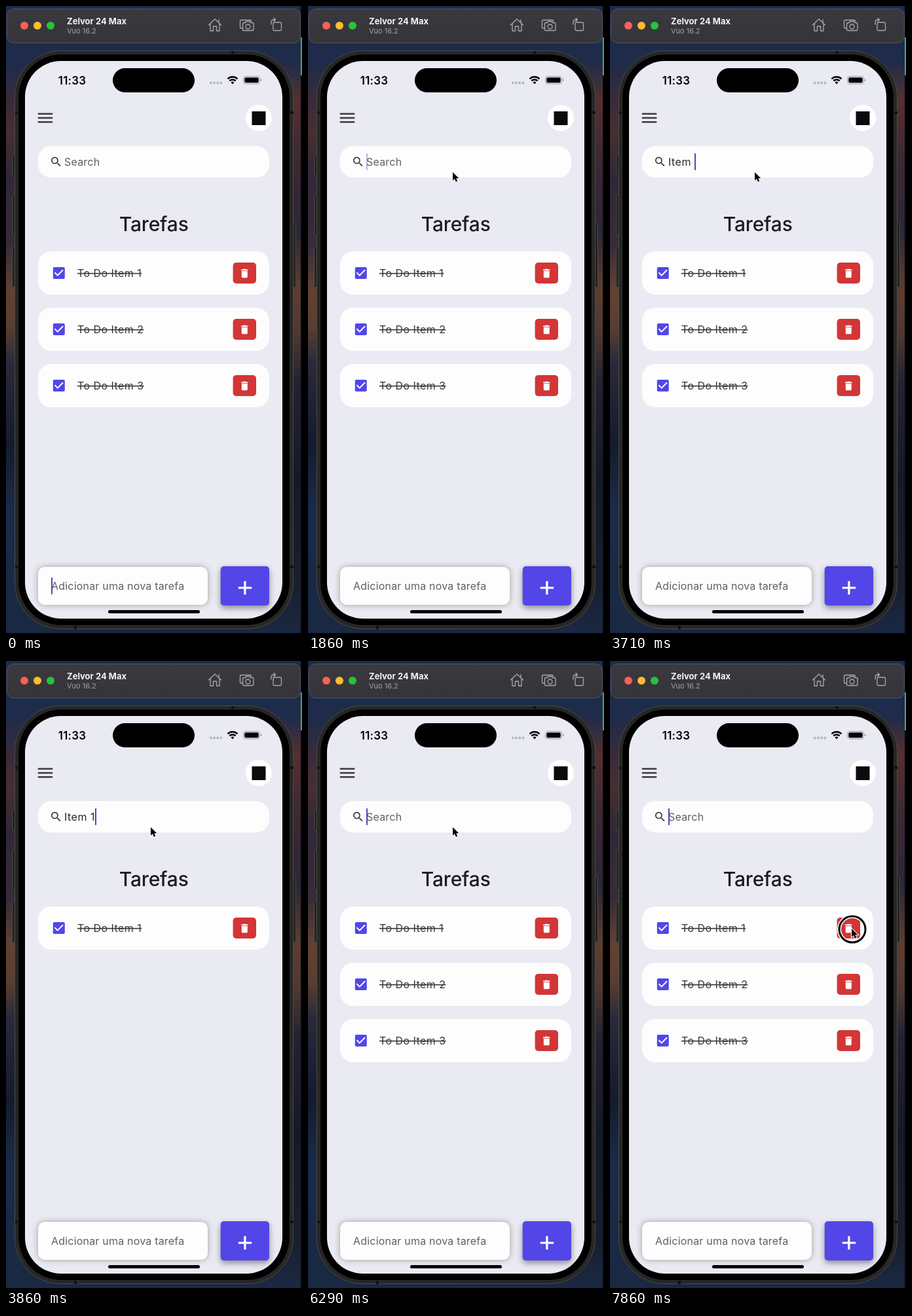
Write an HTML page that moves like this. It is 452 by 958 pixels and loops after 8 s.

```html
<!DOCTYPE html>
<html lang="pt">
<head>
<meta charset="utf-8">
<title>Tarefas</title>
<style>
html, body { margin: 0; width: 100%; height: 100%; overflow: hidden; background: #17182a; }
svg { display: block; width: 452px; height: 958px; font-family: Inter, Roboto, "Liberation Sans", sans-serif; }
text { white-space: pre; }
.field { font-size: 16px; letter-spacing: .2px; }
.hint { fill: #606065; }
.item { font-size: 16px; letter-spacing: .45px; fill: #37373b; text-decoration: line-through; }
.line { fill: none; stroke: #aaa9ae; stroke-width: 1.3; stroke-linejoin: round; stroke-linecap: round; }
#query { letter-spacing: .5px; fill: #28282c; }
</style>
</head>
<body>
<svg viewBox="0 0 452 958">
  <defs>
    <linearGradient id="skyL" x2="0" y2="1">
      <stop offset="0" stop-color="#1c2c4c"/>
      <stop offset=".09" stop-color="#1f2b4a"/>
      <stop offset=".14" stop-color="#352b3c"/>
      <stop offset=".2" stop-color="#482e32"/>
      <stop offset=".27" stop-color="#302738"/>
      <stop offset=".38" stop-color="#382b39"/>
      <stop offset=".45" stop-color="#614132"/>
      <stop offset=".51" stop-color="#5c3e30"/>
      <stop offset=".57" stop-color="#2a293c"/>
      <stop offset=".7" stop-color="#141b2c"/>
      <stop offset=".8" stop-color="#1a2b49"/>
      <stop offset="1" stop-color="#1a2942"/>
    </linearGradient>
    <linearGradient id="skyR" x2="0" y2="1">
      <stop offset="0" stop-color="#1c2c4c"/>
      <stop offset=".09" stop-color="#1f2b4a"/>
      <stop offset=".15" stop-color="#553030"/>
      <stop offset=".25" stop-color="#3c2833"/>
      <stop offset=".36" stop-color="#2c2638"/>
      <stop offset=".45" stop-color="#5c3e30"/>
      <stop offset=".52" stop-color="#523830"/>
      <stop offset=".6" stop-color="#232234"/>
      <stop offset=".75" stop-color="#151927"/>
      <stop offset=".93" stop-color="#191f30"/>
      <stop offset="1" stop-color="#1a2942"/>
    </linearGradient>
    <linearGradient id="bar" x2="0" y2="1">
      <stop offset="0" stop-color="#3a393f"/>
      <stop offset="1" stop-color="#353439"/>
    </linearGradient>
    <g id="card">
      <rect x="49" y="375" width="353" height="66" rx="20" fill="#fdfdfe"/>
      <path transform="translate(68.800 396)" fill="#5346e8" d="M19 3H5c-1.11 0-2 .9-2 2v14c0 1.1.89 2 2 2h14c1.11 0 2-.9 2-2V5c0-1.1-.89-2-2-2zm-9 14l-5-5 1.41-1.41L10 14.17l7.59-7.59L19 8l-9 9z"/>
      <rect x="346.600" y="392" width="35.400" height="32" rx="5" fill="#d33636"/>
      <path transform="translate(355.300 399.500) scale(.75)" fill="#fff" d="M6 19c0 1.1.9 2 2 2h8c1.1 0 2-.9 2-2V7H6v12zM19 4h-3.5l-1-1h-5l-1 1H5v2h14V4z"/>
    </g>
  </defs>

  <!-- desktop -->
  <rect width="230" height="958" fill="url(#skyL)"/>
  <rect x="230" width="222" height="958" fill="url(#skyR)"/>
  <rect x="450" width="2" height="958" fill="#08080c"/>
  <rect x="450" y="48" width="2" height="58" fill="#43a287"/>

  <!-- window bar -->
  <rect x="1.5" y="4.5" width="448" height="52" rx="10" fill="url(#bar)" stroke="#55545a"/>
  <circle cx="28" cy="30" r="6" fill="#fe5f57"/>
  <circle cx="48" cy="30" r="6" fill="#febc2e"/>
  <circle cx="68" cy="30" r="6" fill="#28c23c"/>
  <text x="93" y="28" font-size="13" font-weight="700" fill="#f4f4f5">Zelvor 24 Max</text>
  <text x="93" y="42" font-size="11" fill="#a3a2a8">Vuo 16.2</text>
  <g class="line">
    <path d="M309.500 29L319 20l9.500 9M312 27v11h4.500v-7h5v7h4.500V27M325 25v-4"/>
    <path d="M361 34h-1.500q-2 0-2-2v-8.500q0-2 2-2h13q2 0 2 2"/>
    <path d="M363.500 25.500h2l1.500-2h5l1.500 2h2.500q2 0 2 2v8q0 2-2 2h-12.500q-2 0-2-2v-8q0-2 2-2z"/>
    <circle cx="369.500" cy="31.500" r="3.500"/>
    <rect x="408" y="25" width="12.500" height="12.500" rx="1.800"/>
    <path d="M405 28v-3q0-4 4-4h2M409 18.500l2.500 2.500-2.500 2.500"/>
  </g>

  <!-- phone -->
  <g fill="#242423" stroke="#4b4a47">
    <rect x="9.500" y="227.500" width="6" height="32" rx="1"/>
    <rect x="9.500" y="288.500" width="6" height="62" rx="1"/>
    <rect x="9.500" y="367.500" width="6" height="62" rx="1"/>
    <rect x="436.500" y="329.500" width="6" height="100" rx="1"/>
  </g>
  <rect x="13.500" y="68.500" width="425" height="883" rx="70" fill="#262624" stroke="#4b4a46"/>
  <path d="M14 163h5M434 163h5M14 857h5M434 857h5M346 69v5M106 947v5" stroke="#111" stroke-width="4"/>
  <rect x="18.500" y="73.500" width="415" height="873" rx="66" stroke="#2f2e2b"/>
  <rect x="29" y="84" width="393" height="852" rx="55" fill="#eaeaf2"/>

  <!-- status bar -->
  <rect x="163" y="95" width="125" height="37" rx="18.500"/>
  <text x="79.800" y="119.500" font-size="17" font-weight="600" letter-spacing=".2">11:33</text>
  <path d="M312.800 117.500h16" stroke="#b6b6bd" stroke-width="4" stroke-linecap="round" stroke-dasharray="0 5.200"/>
  <g fill="none" stroke="#000" stroke-width="2.500">
    <path d="M338.500 111.300a10.800 10.800 0 0 1 15 0M341.300 114.400a6.700 6.700 0 0 1 9.400 0"/>
  </g>
  <path d="M346 119.500l-2.500-2.700a3.600 3.600 0 0 1 5 0z"/>
  <rect x="362.500" y="107.500" width="25" height="11.500" rx="3.500" fill="none" stroke="#98989f"/>
  <rect x="364.200" y="109.200" width="21.600" height="8.100" rx="2.200"/>
  <path d="M389 111.300q1.500 .6 1.500 2t-1.500 2z" fill="#98989f"/>

  <!-- header -->
  <path d="M48.750 164.750h22.500M48.750 171h22.500M48.750 177.250h22.500" stroke="#3a3a3f" stroke-width="2.500"/>
  <circle cx="386" cy="171" r="20" fill="#fff"/>
  <rect x="375.500" y="161" width="21" height="21" fill="#0b0b0d"/>
  <rect x="49" y="214" width="353" height="48" rx="20" fill="#fdfdfe"/>
  <path transform="translate(66.500 228) scale(.833)" fill="#37373b" d="M15.500 14h-.79l-.28-.27A6.471 6.471 0 0 0 16 9.500 6.500 6.500 0 1 0 9.500 16c1.610 0 3.090-.59 4.230-1.570l.27.28v.79l5 4.990L20.490 19l-4.990-5zm-6 0C7.010 14 5 11.990 5 9.500S7.010 5 9.500 5 14 7.010 14 9.500 11.990 14 9.500 14z"/>
  <text id="hint" class="field hint" x="89" y="244">Search</text>
  <text id="query" class="field" x="89" y="244"></text>
  <text x="225.700" y="344" font-size="30" font-weight="500" letter-spacing="-.15" text-anchor="middle" fill="#1c1b20">Tarefas</text>
  <g id="list"></g>

  <!-- new task -->
  <rect x="49" y="857" width="259" height="58" rx="10" fill="#fdfdfe" style="filter:drop-shadow(0 0 5px #9e9e9e)"/>
  <text class="field hint" x="69" y="892">Adicionar uma nova tarefa</text>
  <rect x="327.700" y="856" width="74.300" height="60" rx="5" fill="#5346e8" style="filter:drop-shadow(0 4px 5px #0006)"/>
  <path d="M354.700 889h20.500M364.900 878.800v20.500" stroke="#fff" stroke-width="3.200"/>
  <rect x="156" y="923" width="140" height="5" rx="2.500"/>

  <rect id="caret" width="2" height="26" rx="1" fill="#5546b4"/>
  <g id="ring" fill="none">
    <circle r="20" stroke="#fff" stroke-width="6"/>
    <circle r="20" stroke="#000" stroke-width="3"/>
  </g>
  <path id="pointer" d="M0 0v12.800l2.900-2.700 2 4.700 2.400-1-2-4.600h4z" stroke="#fff" stroke-width="2" paint-order="stroke"/>
</svg>
<script>
const LOOP = 8000, FOCUS = 1270;
const $ = id => document.getElementById(id);
const [hint, query, list, caret, ring, pointer] =
  ['hint', 'query', 'list', 'caret', 'ring', 'pointer'].map($);

// [time, search text]
const keys = [
  [2950, 'I'], [3130, 'It'], [3280, 'Ite'], [3420, 'Item'], [3560, 'Item '], [3720, 'Item 1'],
  [4180, 'Item '], [5000, 'Item'], [5210, 'Ite'], [5450, 'It'], [5640, 'I'], [5830, '']
];
// [time, x, y] of the mouse pointer
const path = [[570, 470, 330], [1130, 221, 254], [6600, 221, 254], [7600, 369, 409]];
const clicks = [[1140, 1420], [7710, 8000]];

const names = [1, 2, 3].map(n => 'To Do Item ' + n);
list.innerHTML = names.map((name, i) =>
  `<g transform="translate(0 ${i * 86})"><use href="#card"/><text class="item" x="109" y="414">${name}</text></g>`).join('');

const show = (el, on) => el.style.display = on ? '' : 'none';
const place = (el, x, y) => el.setAttribute('transform', `translate(${x} ${y})`);
const clamp = v => Math.max(0, Math.min(1, v));

// solid for half a second, then fades out and back in
function blink(ms) {
  const p = ms % 1000;
  return p < 750 ? clamp((650 - p) / 150) : clamp((p - 850) / 150);
}

function pointerAt(t) {
  let i = 0;
  while (i < path.length - 2 && t >= path[i + 1][0]) i++;
  const [t0, x0, y0] = path[i], [t1, x1, y1] = path[i + 1];
  const u = clamp((t - t0) / (t1 - t0)), e = u * u * (3 - 2 * u);
  return [x0 + (x1 - x0) * e, y0 + (y1 - y0) * e];
}

function draw(t) {
  const last = keys.filter(k => k[0] <= t).pop();
  const text = last ? last[1] : '', focused = t >= FOCUS;
  query.textContent = text;
  show(hint, !text);
  names.forEach((name, i) => show(list.children[i], name.includes(text)));

  if (focused) place(caret, 89 + (text ? Math.round(query.getComputedTextLength()) : 0), 225);
  else place(caret, 69, 873);
  caret.setAttribute('opacity', blink(t - (last ? last[0] : focused ? FOCUS : 0)));

  const [x, y] = pointerAt(t);
  place(pointer, x, y);
  place(ring, x + 1, y + 1);
  show(pointer, t >= path[0][0]);
  show(ring, clicks.some(([a, b]) => t >= a && t < b));
}

const start = performance.now();
function tick() {
  draw((performance.now() - start) % LOOP);
  requestAnimationFrame(tick);
}
tick();
</script>
</body>
</html>
```
